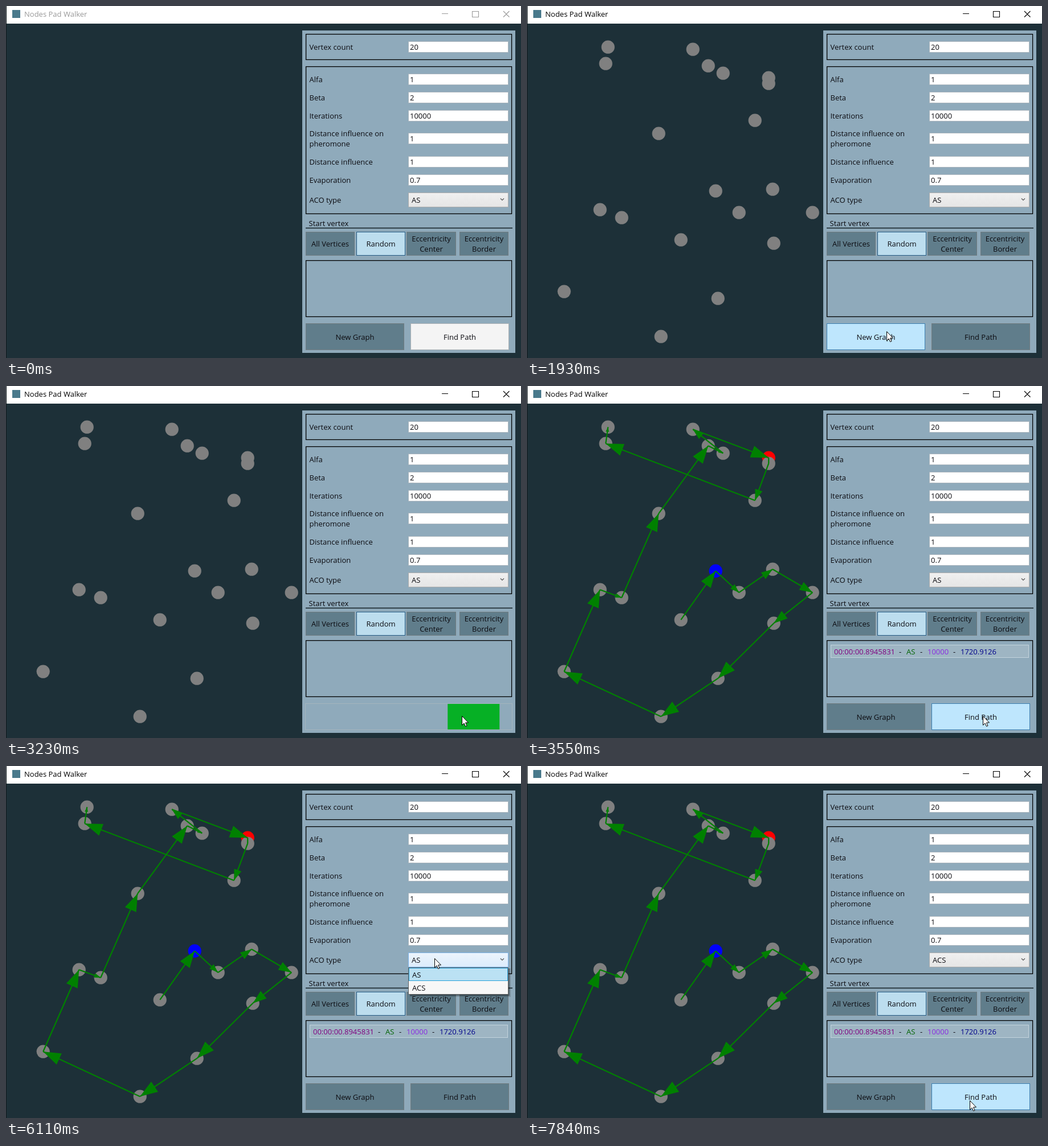
Recreate the animation shown at these times as an HTML page. Size 904 px wide and 619 px high, loop 7990 ms.

```html
<!DOCTYPE html>
<html lang="en">
<head>
<meta charset="utf-8">
<title>Nodes Pad Walker</title>
<style>
  html, body { margin: 0; width: 100%; height: 100%; overflow: hidden; background: #1d3038; }
  svg { display: block; width: 100vw; height: 100vh; }
  svg svg { width: auto; height: auto; }
  text { font: 13px "Open Sans", "Noto Sans", sans-serif; white-space: pre; }
</style>
</head>
<body>
<svg viewBox="0 0 904 619">
  <defs>
    <linearGradient id="plain" x2="0" y2="1"><stop stop-color="#f0f0f0"/><stop offset="1" stop-color="#e5e5e5"/></linearGradient>
    <linearGradient id="over" x2="0" y2="1"><stop stop-color="#ecf4fc"/><stop offset="1" stop-color="#dcecfc"/></linearGradient>
    <clipPath id="bar"><rect x="526" y="559" width="362" height="45"/></clipPath>
  </defs>
  <g id="scene"></g>
</svg>
<script>
const LOOP = 7990, HOLD = 150;
// Moments of the four clicks and what follows from them
const NEW = 900, FIND = 2460, DROP = 5880, PICK = 6890;
const NODES = NEW + 80, BUSY = FIND + HOLD, SOLVED = 3540, OPEN = DROP + 70, CHOSEN = PICK + 80;

// Pointer glides: start, duration, where to
const ENTER = 210, ENTRY = [698, 590];
const GLIDES = [
  [ENTER, 380, [631, 572]], [1930, 460, [800, 580]], [5330, 10, [797, 557]],
  [5340, 380, [752, 338]], [6330, 240, [738, 393]], [7370, 470, [777, 588]]
];

// Vertices in the order in which the path visits them
const PATH = [[270, 411], [331, 325], [372, 363], [431, 322], [501, 363], [433, 417], [335, 514],
  [235, 581], [65, 502], [128, 358], [166, 372], [231, 224], [318, 105], [344, 118], [291, 76],
  [424, 126], [424, 136], [400, 201], [138, 101], [142, 72]].map(p => p.map(v => v + 0.2));
const FIRST = 1, LAST = 15;

const inside = (p, x, y, r, b) => p && p[0] >= x && p[0] < r && p[1] >= y && p[1] < b;
const ease = u => u * u * (3 - 2 * u);

function pointerAt(t) {
  if (t < ENTER) return null;
  return GLIDES.reduce((from, [start, ms, to]) => {
    const u = ease(Math.min(1, Math.max(0, (t - start) / ms)));
    return from.map((v, i) => v + (to[i] - v) * u);
  }, ENTRY);
}

const fillBox = (x, y, r, b, fill, extra = "") =>
  `<rect x="${x}" y="${y}" width="${r - x}" height="${b - y}" fill="${fill}" ${extra}/>`;
const box = (x, y, r, b, fill, stroke) =>
  fillBox(x + 0.5, y + 0.5, r - 0.5, b - 0.5, fill, `stroke="${stroke}"`);
const frame = (y, b) =>
  fillBox(526.6, y + 0.6, 887.6, b - 0.6, "none", 'stroke="#000" stroke-width="1.3"');
const line = (d, stroke, width = 1) => `<path d="${d}" fill="none" stroke="${stroke}" stroke-width="${width}"/>`;
const label = (x, y, s, fill = "#0b0b10", anchor = "start") =>
  `<text x="${x}" y="${y}" fill="${fill}" text-anchor="${anchor}">${s}</text>`;

const LOOKS = {
  normal: ["#607d8b", "#707b80"], hover: ["#bee6fd", "#3c7fb1"], pressed: ["#c4e5f6", "#2c628b"],
  checked: ["#bcddee", "#245a83"], disabled: ["#f4f4f4", "#adb2b5"]
};

function button(x, y, r, b, text, look) {
  const lines = text.split("\n"), top = (y + b) / 2 + 14 - lines.length * 9;
  return box(x, y, r, b, ...LOOKS[look]) +
    lines.map((s, i) => label((x + r) / 2, top + i * 18, s, "#0b0b10", "middle")).join("");
}

function titleBar(active) {
  const ink = active ? "#000" : "#999";
  return fillBox(0, 0, 904, 31, "#fff") + fillBox(0, 0, 1, 619, "#10181c") +
    fillBox(11, 7, 25, 21, "#4a7a8c") +
    label(32, 19, "Nodes Pad Walker", ink) +
    line("M765 13.5H776M818.5 9.5H829.5V19.5H818.5ZM873 9L883.5 19.5M883.5 9L873 19.5", ink, 1.1);
}

function edge([x, y], [u, v]) {
  const len = Math.hypot(u - x, v - y), head = Math.min(31, len * 0.28), half = head * 0.35;
  const dx = (u - x) / len, dy = (v - y) / len, bx = u - dx * head, by = v - dy * head;
  return line(`M${x} ${y}L${u} ${v}`, "green", 2.2) +
    `<path fill="green" d="M${u} ${v}L${bx - dy * half} ${by + dx * half}L${bx + dy * half} ${by - dx * half}Z"/>`;
}

function graph(solved) {
  const color = i => solved && i === FIRST ? "#00f" : solved && i === LAST ? "#f00" : "#808080";
  const dots = PATH.map(([x, y], i) => `<circle cx="${x}" cy="${y}" r="11.6" fill="${color(i)}"/>`);
  const edges = solved ? PATH.slice(1).map((p, i) => edge(PATH[i], p)) : [];
  return dots.concat(edges).join("");
}

const SETTINGS = { "Alfa": 1, "Beta": 2, "Iterations": 10000, "Distance influence on\npheromone": 1,
  "Distance influence": 1, "Evaporation": 0.7 };

function field(y, name, value) {
  const lines = name.split("\n"), top = y + 24 - lines.length * 9;
  return lines.map((s, i) => label(532.5, top + i * 18, s)).join("") +
    box(706, y, 882, y + 20, "#fff", "#abb5bd") + label(709, y + 15, value);
}

// Rows stack up; a two-line name makes its row taller
function settings() {
  let y = 119, out = "";
  for (const [name, value] of Object.entries(SETTINGS)) {
    const extra = name.includes("\n") ? 8 : 0;
    out += field(Math.floor(y + extra), name, value);
    y += 32.3 + 2 * extra;
  }
  return out;
}

function form(t, p, open) {
  const over = inside(p, 706, 328, 882, 354);
  const center = !open && inside(p, 703, 397, 790, 439) ? "hover" : "normal";
  return fillBox(520, 43, 894, 610, "#8faabb") +
    frame(49, 95) + frame(106, 366) + frame(447, 547) +
    field(62, "Vertex count", 20) + settings() + label(532.5, 346, "ACO type") +
    box(706, 328, 882, 354, over ? "url(#over)" : "url(#plain)", over ? "#7eb4ea" : "#acacac") +
    label(712, 346, t < CHOSEN ? "AS" : "ACS") + line("M868 338.5L871 341.5L874 338.5", "#555", 1.2) +
    label(531.5, 387, "Start vertex") + line("M526 390.5H889", "#111c22", 1.3) +
    button(526, 397, 612, 439, "All Vertices", "normal") +
    button(615, 397, 701, 439, "Random", "checked") +
    button(703, 397, 790, 439, "Eccentricity\nCenter", center) +
    button(796, 397, 882, 439, "Eccentricity\nBorder", "normal");
}

function actions(t, p, down) {
  if (t >= BUSY && t < SOLVED) {
    const x = 775 + (t - 3230) * 0.272;
    return box(525, 558, 889, 605, "none", "#a5b4bd") +
      fillBox(x, 559, x + 91, 604, "#06b025", 'clip-path="url(#bar)"');
  }
  const look = (x, r) => !inside(p, x, 556, r, 605) ? "normal" : down ? "pressed" : "hover";
  return button(526, 558, 699, 605, "New Graph", look(526, 699)) +
    button(710, 558, 883, 605, "Find Path", t < NODES ? "disabled" : look(710, 883));
}

const result = () => box(533, 455, 881, 478, "#9eb5c3", "#c3d3dc") +
  label(539, 472, "00:00:00.8945831", "#800080") + label(653, 472, "-") + label(666, 472, "AS", "#006400") +
  label(690, 472, "-") + label(703, 472, "10000", "#8a2be2") + label(748, 472, "-") +
  label(761, 472, "1720.9126", "#00008b");

function popup(t, p) {
  const item = (y, s, on) => (on ? box(707, y, 881, y + 23, "#bbe1f3", "#26a0da") : "") + label(713, y + 17, s);
  const low = inside(p, 706, 378, 882, 402);
  const b = 354 + 48 * ease(Math.min(1, (t - OPEN + 70) / 150));
  return `<svg x="706" y="354" width="181" height="${b - 349}" viewBox="706 354 181 ${b - 349}" style="width:181px;height:${b - 349}px">` +
    fillBox(709, 356, 886, b + 4, "#000", 'opacity=".15"') +
    fillBox(709, 356, 884, b + 2, "#000", 'opacity=".3"') +
    box(706, 354, 882, b, "#f7f7f7", "#646464") +
    item(355, "AS", !low) + item(378, "ACS", low) + "</svg>";
}

const arrow = ([x, y]) => `<path transform="translate(${x} ${y})" fill="#fff" stroke="#000"
  d="M.5 .5V16.5L4 13L6.5 18.5L9 17.5L6.6 12H11.5Z"/>`;

function scene(t) {
  const p = pointerAt(t), open = t >= OPEN && t < CHOSEN;
  const down = [NEW, FIND, DROP, PICK].some(c => t >= c && t < c + HOLD);
  return titleBar(t >= NEW) +
    (t >= NODES ? graph(t >= SOLVED) : "") +
    form(t, p, open) + actions(t, p, down) +
    (t >= SOLVED ? result() : "") +
    (open ? popup(t, p) : "") +
    (down ? `<circle cx="${p[0]}" cy="${p[1]}" r="14" fill="#ff0" opacity=".6"/>` : "") +
    (p ? arrow(p) : "");
}

const root = document.getElementById("scene");
let shown = "";
function tick() {
  const markup = scene(performance.now() % LOOP);
  if (markup !== shown) root.innerHTML = shown = markup;
  requestAnimationFrame(tick);
}
tick();
</script>
</body>
</html>
```
